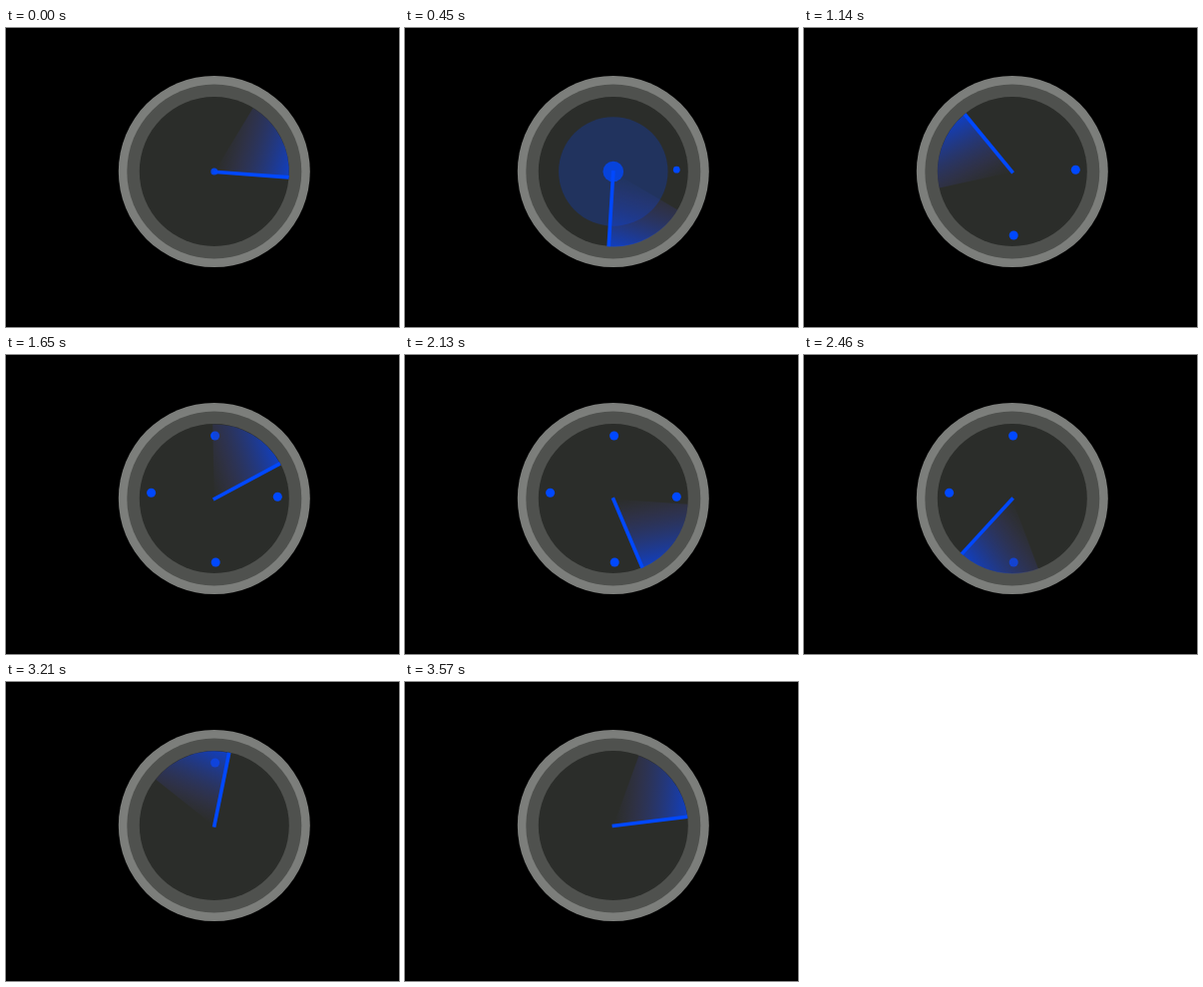
Recreate the animation shown at these times as an HTML page with a canvas. Size 394 px wide and 300 px high, loop 3600 ms.

```html
<!DOCTYPE html>
<html lang="en">
<head>
<meta charset="utf-8">
<title>Radar</title>
<style>
  html, body { margin: 0; width: 100%; height: 100%; overflow: hidden; background: #000; }
  canvas { display: block; width: 394px; height: 300px; }
</style>
</head>
<body>
<canvas id="stage" width="394" height="300"></canvas>
<script>
const ctx = document.getElementById('stage').getContext('2d');
const LOOP = 3600, STEP = 30;
const CX = 208.8, CY = 144, RADIUS = 75;
const BLUE = '#0048ff';
const rad = deg => deg * Math.PI / 180;
const progress = (t, start, length) => Math.min(1, Math.max(0, (t - start) / length));

// Each blip grows during the first turn and shrinks during the second.
const blips = [[272.3, 142.2], [210.2, 208], [145.6, 138.3], [209.6, 81]]
  .map(([x, y], i) => ({ x, y, show: 360 + 390 * i, hide: 2190 + 375 * i }));

function disc(x, y, r, color) {
  ctx.fillStyle = color;
  ctx.beginPath();
  ctx.arc(x, y, r, 0, 2 * Math.PI);
  ctx.fill();
}

function drawPulse(t, start) {
  const p = (t - start) / 540;
  if (p < 0 || p >= 1) return;
  disc(CX, CY, 3.5 + 61.5 * p, `rgba(0, 72, 255, ${0.86 - 0.74 * p})`);
}

function drawBlip(t, { x, y, show, hide }) {
  const size = progress(t, show, 120) - progress(t, hide, 120);
  if (size > 0) disc(x, y, 4.5 * size, BLUE);
}

function drawSweep(t) {
  ctx.save();
  ctx.translate(CX, CY + 0.4);
  ctx.rotate(rad(4.2 + 5.956 * t / STEP));

  const tilt = rad(12);
  const fade = ctx.createLinearGradient(0, 0, RADIUS * Math.cos(tilt), RADIUS * Math.sin(tilt));
  fade.addColorStop(0, 'rgba(64, 60, 110, 0)');
  fade.addColorStop(0.3, 'rgba(52, 58, 130, 0.35)');
  fade.addColorStop(1, 'rgba(8, 68, 235, 0.82)');
  ctx.fillStyle = fade;
  ctx.beginPath();
  ctx.moveTo(0, 0);
  ctx.arc(0, 0, RADIUS, rad(-63), 0);
  ctx.fill();

  ctx.strokeStyle = BLUE;
  ctx.lineWidth = 3.6;
  ctx.beginPath();
  ctx.moveTo(-1.2, 0);
  ctx.lineTo(RADIUS, 0);
  ctx.stroke();
  ctx.restore();
}

function draw(t) {
  ctx.fillStyle = '#000';
  ctx.fillRect(0, 0, 394, 300);
  disc(CX, CY, 96, '#7c7e7b');
  disc(CX, CY, 87.5, '#4f514e');
  disc(CX, CY, RADIUS, '#2b2d2a');
  blips.forEach(blip => drawBlip(t, blip));
  drawSweep(t);
  drawPulse(t, 0);
  drawPulse(t, 390);
}

const began = performance.now();
function tick() {
  const t = (performance.now() - began) % LOOP;
  draw(Math.floor(t / STEP) * STEP);
  requestAnimationFrame(tick);
}
tick();
</script>
</body>
</html>
```
